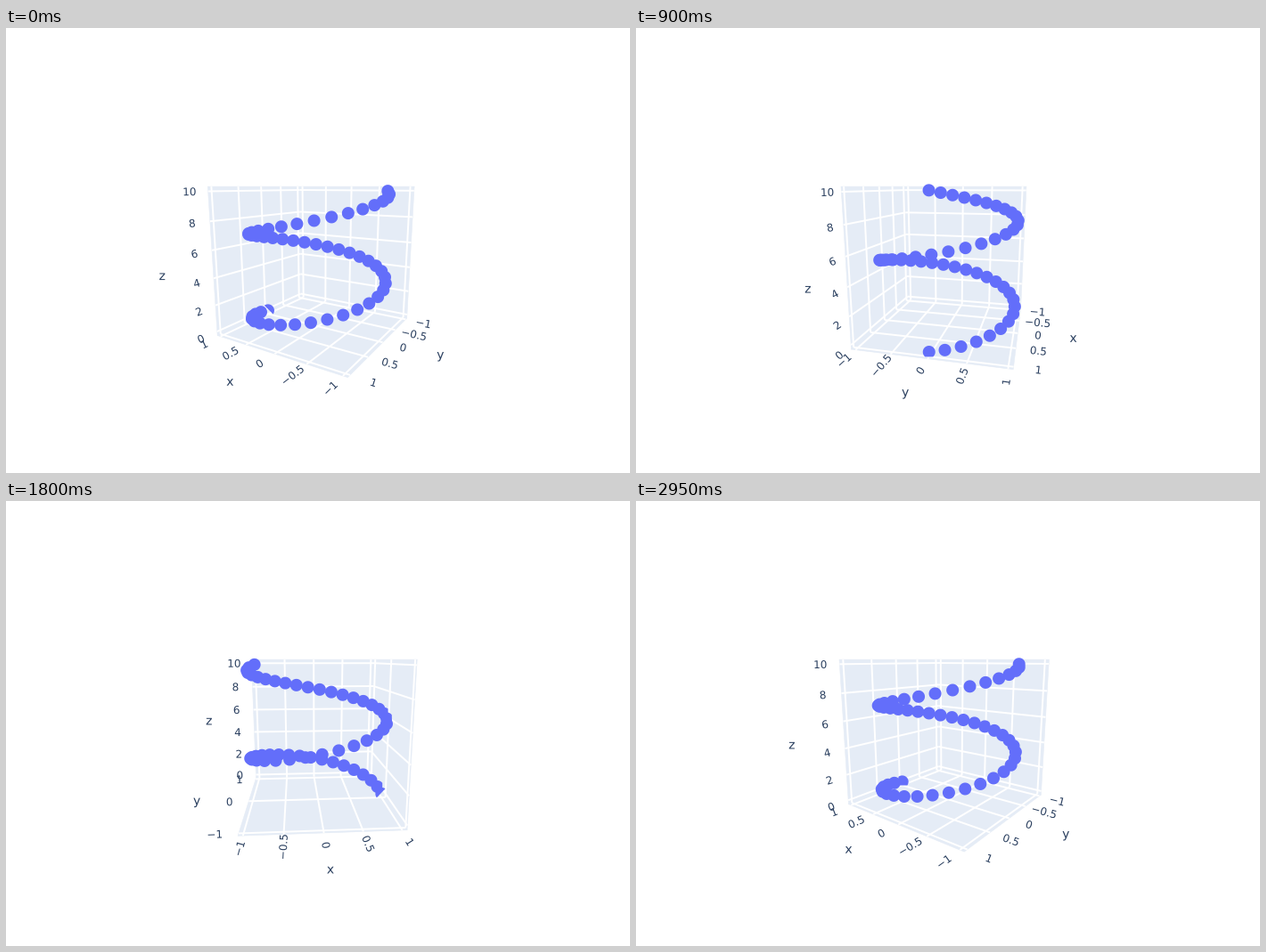
A matplotlib script for the animation above (3000 ms loop, 700 by 500 pixels).

```python
import numpy as np
import matplotlib.pyplot as plt
from matplotlib.animation import FuncAnimation
from matplotlib.collections import LineCollection, PathCollection, PolyCollection
from matplotlib.textpath import TextPath
from matplotlib.transforms import Affine2D

W, H, DPI = 700, 500, 100
FRAMES, INTERVAL = 60, 50
CENTER = np.array([350, 240])               # scene centre, y pointing up
FOCAL = 160 / np.tan(np.pi / 8)             # 45 degree lens on a 320 px view
EYE = np.array([-1.25, 2, 0.5])
TICK_PAD, TITLE_PAD = 0.137, 0.366
RADIUS = 7
FACE, INK, DOT = "#e5ecf6", "#2a3f5f", "#636efa"

# Helix scaled into a unit cube centred on the origin
t = np.linspace(0, 10, 50)
data = np.column_stack([np.cos(t), np.sin(t), t])
low, high = data.min(axis=0), data.max(axis=0)
MID, SPAN = (low + high) / 2, (high - low) * 17 / 16
POINTS = (data - MID) / SPAN

turn = np.linspace(0, 2 * np.pi, 120, endpoint=False)
CIRCLE = RADIUS * np.column_stack([np.cos(turn), np.sin(turn)])


class Camera:
    def __init__(self, azimuth):
        dist = np.hypot(EYE[0], EYE[1])
        c, s = np.cos(azimuth), np.sin(azimuth)
        self.eye = np.array([dist * c, dist * s, EYE[2]])
        self.forward = -self.eye / np.linalg.norm(self.eye)
        self.right = np.array([-s, c, 0])
        self.up = np.cross(self.right, self.forward)

    def depth(self, p):
        return (p - self.eye) @ self.forward

    def project(self, p):
        v = np.asarray(p, float) - self.eye
        plane = np.stack([v @ self.right, v @ self.up], axis=-1)
        return CENTER + FOCAL * plane / (v @ self.forward)[..., None]


def spot(**coords):
    return np.array([coords.get(k, 0.0) for k in "xyz"])


def unit(axis, sign=1):
    v = np.zeros(3)
    v[axis] = sign
    return v


def tick_values(azimuth):
    """Ticks per axis; an axis pointing at the viewer gets fewer."""
    limit = np.cos(np.radians(9))
    steps = [1 if abs(f) > limit else 0.5 for f in (np.cos(azimuth), np.sin(azimuth))]
    flat = [np.arange(-1, 1.01, s) for s in steps]
    return flat + [np.arange(0, 10.1, 2)]


def tick_text(v):
    return f"{v:g}".replace("-", "\u2212")


glyphs = {}


def text_path(label, size, pos, angle=0.0):
    """Glyph outlines with the middle of their ink at pos."""
    if (label, size) not in glyphs:
        path = TextPath((0, 0), label, size=size)
        box = path.get_extents()
        shift = Affine2D().translate(-(box.x0 + box.x1) / 2, -(box.y0 + box.y1) / 2)
        glyphs[label, size] = shift.transform_path(path)
    return Affine2D().rotate(angle).translate(*pos).transform_path(glyphs[label, size])


def wall(axis, side):
    a, b = [i for i in range(3) if i != axis]
    corners = np.zeros((4, 3))
    corners[:, axis] = side
    corners[:, a] = [-0.5, 0.5, 0.5, -0.5]
    corners[:, b] = [-0.5, -0.5, 0.5, 0.5]
    return corners


def wall_grid(axis, side, ticks):
    a, b = [i for i in range(3) if i != axis]
    for along, across in ((a, b), (b, a)):
        for v in (ticks[along] - MID[along]) / SPAN[along]:
            line = np.zeros((2, 3))
            line[:, axis] = side
            line[:, along] = v
            line[:, across] = -0.5, 0.5
            yield line


def axis_labels(cam, axis, edge, pad_axis, pad_sign, ticks):
    """Tick labels and title of one axis, pushed outward from its edge."""
    out = unit(pad_axis, pad_sign)
    paths = []
    for v in ticks[axis]:
        p = edge + unit(axis) * (v - MID[axis]) / SPAN[axis] + out * TICK_PAD
        a, b = cam.project(p), cam.project(p + out * 0.01)
        dx, dy = b - a
        paths.append(text_path(tick_text(v), 12, a, np.arctan(dy / dx)))
    paths.append(text_path("xyz"[axis], 14, cam.project(edge + out * TITLE_PAD)))
    return paths


def marker(cam, p, walls):
    """Screen-facing disc, cut off where it sinks into a wall."""
    plane = CIRCLE * cam.depth(p) / FOCAL
    rim = p + plane[:, :1] * cam.right + plane[:, 1:] * cam.up
    keep = np.ones(len(rim), bool)
    for axis, side in walls:
        keep &= rim[:, axis] * np.sign(side) < 0.5
    return cam.project(rim[keep])


fig = plt.figure(figsize=(W / DPI, H / DPI), dpi=DPI, facecolor="white")
ax = fig.add_axes([0, 0, 1, 1])
ax.set(xlim=(0, W), ylim=(0, H))
ax.axis("off")

faces = PolyCollection([], facecolors=FACE, edgecolors=FACE, linewidths=0.4, zorder=1)
grid = LineCollection([], colors="white", linewidths=2 * 72 / DPI,
                      capstyle="butt", zorder=2)
labels = PathCollection([], facecolors=INK, linewidths=0, zorder=3)
dots = PolyCollection([], facecolors=DOT, linewidths=0, zorder=4)
for item in (faces, grid, labels, dots):
    ax.add_collection(item, autolim=False)
labels.set_transform(ax.transData)


def update(n):
    azimuth = np.arctan2(EYE[1], EYE[0]) - 2 * np.pi * n / FRAMES
    cam = Camera(azimuth)
    ticks = tick_values(azimuth)
    sx, sy = np.sign(cam.eye[:2])
    walls = [(0, -sx / 2), (1, -sy / 2), (2, -0.5)]

    faces.set_verts([cam.project(wall(*w)) for w in walls])
    grid.set_segments([cam.project(line) for w in walls
                       for line in wall_grid(*w, ticks)])

    # The z axis stands on the left corner, a quarter turn from the nearest one
    left = spot(x=sy / 2, y=-sx / 2)
    z_pad = (0, sx) if sx == sy else (1, sy)
    labels.set_paths(
        axis_labels(cam, 0, spot(y=sy / 2, z=-0.5), 1, sy, ticks)
        + axis_labels(cam, 1, spot(x=sx / 2, z=-0.5), 0, sx, ticks)
        + axis_labels(cam, 2, left, *z_pad, ticks))

    dots.set_verts([marker(cam, p, walls) for p in POINTS])
    return faces, grid, labels, dots


anim = FuncAnimation(fig, update, frames=FRAMES, interval=INTERVAL,
                     repeat=True, repeat_delay=0, blit=False)
plt.show()
```
